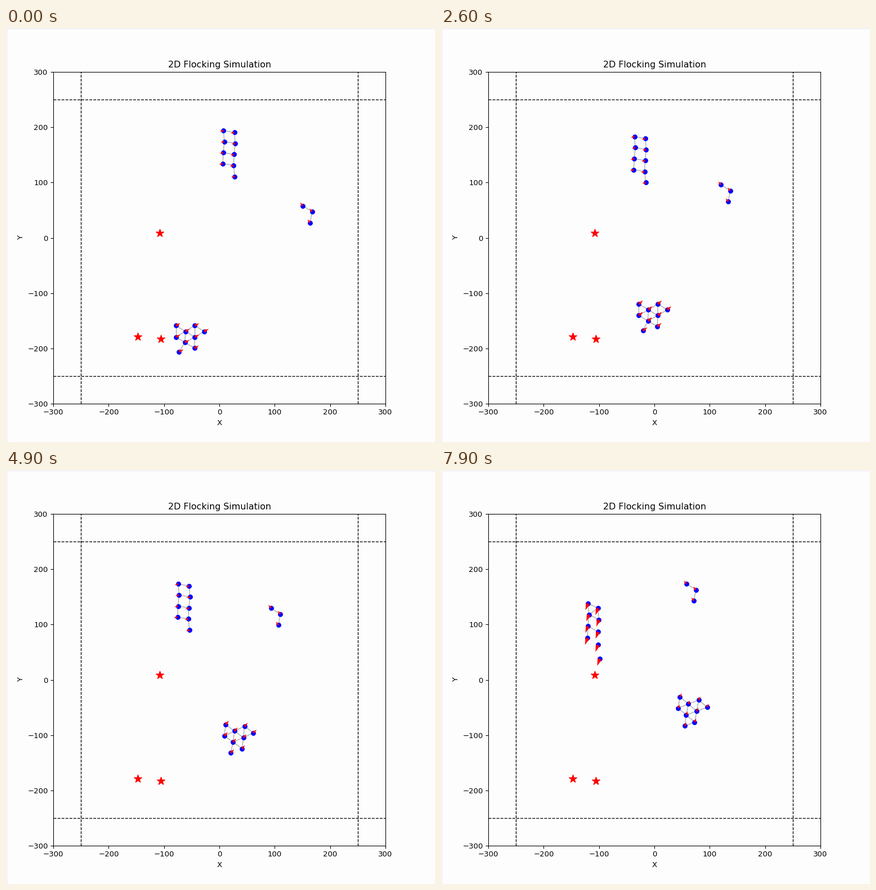
Recreate the animation shown at these times as a matplotlib script. Size 762 by 735 pixels, loop 8 s.

```python
import numpy as np
import matplotlib.pyplot as plt
from matplotlib.animation import FuncAnimation
from matplotlib.collections import LineCollection
from matplotlib.patches import Rectangle

W, H, DPI = 762, 735, 96
FRAMES, INTERVAL = 80, 100
LEFT, BOTTOM, AX_W, AX_H = 84, 68, 590, 589
SCALE = np.array([AX_W, AX_H]) / 600                       # pixels per data unit
ORIGIN = np.array([LEFT + AX_W / 2, H - BOTTOM - AX_H / 2])
SPACING, LINK_DIST = 19.65, 21.2                           # pixels
ARROW_GAIN = 4
PAPER = "#fdfdfe"

plt.rcParams["font.family"] = "DejaVu Sans"
plt.rcParams["font.size"] = 9.97

t = np.arange(FRAMES)


def to_data(p):
    return (np.asarray(p, float) - ORIGIN) / SCALE * [1, -1]


def ease(start, end):
    u = np.clip((t - start) / (end - start), 0, 1)
    return u * u * (3 - 2 * u)


def track(x, y):
    return np.stack(np.broadcast_arrays(x, y), axis=-1)


def spoke(degrees):
    """One lattice step in the given direction, per frame."""
    a = np.radians(degrees)
    return SPACING * track(np.cos(a), np.sin(a))


def ladder_bird(col, row):
    """Cruise left, then swing down to the star, the lower right birds first."""
    x = 386 + 19.3 * col + .3 + 1.5 * np.sin(1.7 * row) - 1.64 * t
    y = 182 + 3.3 * col + 19.55 * row + .418 * t
    start = 71.3 - 2 * col - (.12 + .15 * col) * row**2
    drop = 2.75 * 3 * np.log1p(np.exp((t - start) / 3))
    swing = 2.6 * col / (1 + np.exp((start - 4 - t) / 1.5))
    return track(x + .2 * drop - swing, y + drop)


def ladder_flock():
    return [ladder_bird(col, row) for col in (0, 1) for row in range(4 + col)]


def trio_flock():
    lead = track(527 - 1.152 * t, 315.5 - 1.437 * t)
    return [lead + step for step in [(0, 0), (16.7, 10.7), (13.2, 30)]]


def lattice_flock():
    """Hexagonal patch that slows down and turns a little."""
    hub = track(318.5 + 2 * t - .002 * t**2 - .00005 * t**3,
                538.5 - 1.6 * t + 3.4 * (1 - np.exp(-t / 6)))
    turn = 9.5 * ease(25, 70)
    up, down, south = (spoke(a + turn) for a in (-31, 31, 92))
    tail = spoke(122 - 25 * ease(10, 66))
    steps = [0 * hub, up, down, south, -up, -down, up + down, down + south, south + tail]
    return [hub + step for step in steps]


birds = ladder_flock() + trio_flock() + lattice_flock()
pos = to_data(np.stack(birds, axis=1))
vel = np.gradient(pos, axis=0, edge_order=2) * ARROW_GAIN

fig = plt.figure(figsize=(W / DPI, H / DPI), dpi=DPI, facecolor=PAPER)
fig.add_artist(Rectangle((.5 / W, .5 / H), 1 - 1 / W, 1 - 1 / H, fill=False,
                         ec="#e8e8ea", lw=.75, transform=fig.transFigure))
ax = fig.add_axes([LEFT / W, BOTTOM / H, AX_W / W, AX_H / H], facecolor=PAPER)
ax.set(xlim=(-300, 300), ylim=(-300, 300), xlabel="X", ylabel="Y")
ax.set_title("2D Flocking Simulation", fontsize=11.95)

for edge in (-250, 250):
    ax.axhline(edge, color="black", ls="--", lw=1)
    ax.axvline(edge, color="black", ls="--", lw=1)

stars = to_data([(273.3, 364), (234.4, 547.5), (275.3, 551.6)])
ax.scatter(*stars.T, s=115, marker="*", color="red", zorder=3)

links = ax.add_collection(LineCollection([], colors="gray", linewidths=.8, alpha=.8, zorder=2))
dots, = ax.plot([], [], "o", color="blue", ms=5.6, zorder=3)
arrows = ax.quiver(*pos[0].T, *vel[0].T, color="red", angles="xy",
                   scale_units="xy", scale=1, zorder=4)
pair_a, pair_b = np.triu_indices(pos.shape[1], 1)


def update(i):
    p = pos[i]
    near = np.hypot(*((p[pair_a] - p[pair_b]) * SCALE).T) < LINK_DIST
    links.set_segments(np.stack([p[pair_a[near]], p[pair_b[near]]], axis=1))
    dots.set_data(*p.T)
    arrows.set_offsets(p)
    arrows.XY = p
    arrows.set_UVC(*vel[i].T)
    return links, dots, arrows


anim = FuncAnimation(fig, update, frames=FRAMES, interval=INTERVAL,
                     repeat=True, repeat_delay=0, blit=False)
plt.show()
```
